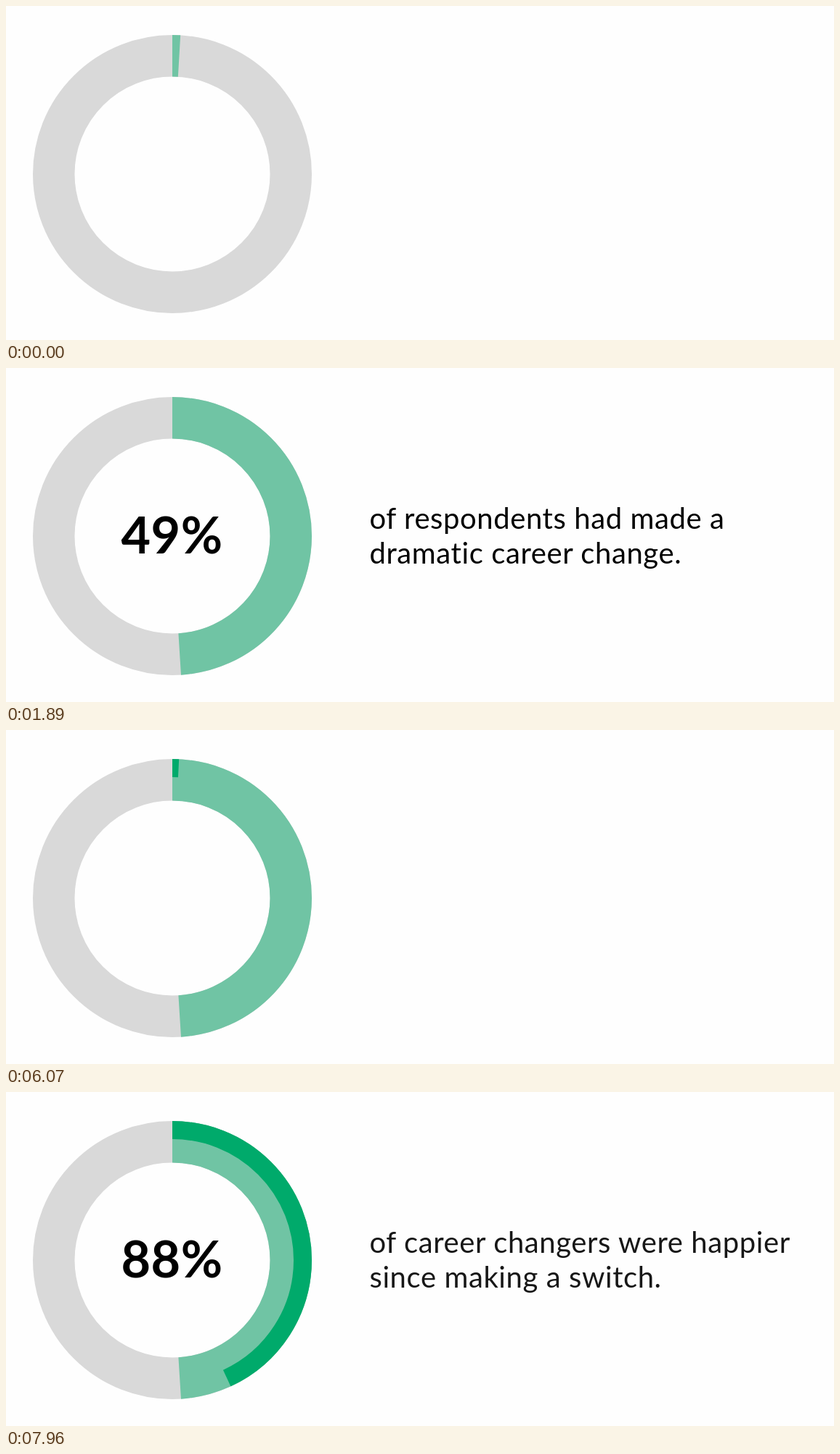
Animation of 1140 by 461 pixels, one loop 7990 ms. Source, as an HTML page:

```html
<!DOCTYPE html>
<html lang="en">
<head>
<meta charset="utf-8">
<title>Career change survey</title>
<style>
  html, body { margin: 0; height: 100%; overflow: hidden; background: #fefefe; }
  svg { display: block; width: 1140px; height: 461px; }
  circle { fill: none; stroke-width: 57.5; }
  text { font: 40px Lato, sans-serif; letter-spacing: .6px; }
  .number { font-size: 70px; font-weight: 700; letter-spacing: .5px; text-anchor: middle; }
</style>
</head>
<body>
<svg viewBox="0 0 1140 461">
  <g transform="translate(229 232) rotate(-90)">
    <circle r="163.25" stroke="#d9d9d9"/>
    <circle id="changed" r="163.25" stroke="#70c4a4" pathLength="360"/>
    <circle id="happier" r="179.5" stroke="#00aa6b" pathLength="360" style="stroke-width: 25"/>
  </g>
  <text id="number1" class="number" x="228.5" y="256">49%</text>
  <text id="number2" class="number" x="228.5" y="256">88%</text>
  <text id="caption1" y="222"><tspan x="500.5">of respondents had made a</tspan><tspan x="500.5" dy="48">dramatic career change.</tspan></text>
  <text id="caption2" y="222"><tspan x="500.5">of career changers were happier</tspan><tspan x="500.5" dy="48">since making a switch.</tspan></text>
</svg>
<script>
  const LOOP = 7990;
  const CHANGED = 360 * 0.49;
  const HAPPIER = CHANGED * 0.88;
  const $ = id => document.getElementById(id);

  // Eased progress from 0 to 1 between two times
  const ramp = (t, start, end) =>
    Math.min(1, Math.max(0, (t - start) / (end - start))) ** 1.36;

  const sweep = (id, degrees) => $(id).setAttribute('stroke-dasharray', `${degrees} 360`);
  const fade = (id, alpha) => $(id).setAttribute('opacity', alpha);

  function draw(t) {
    const fadeOut = ramp(t, 5010, 5760);
    sweep('changed', CHANGED * ramp(t, -30, 540));
    sweep('happier', HAPPIER * ramp(t, 6040, 6640));
    fade('number1', ramp(t, 660, 1380) - fadeOut);
    fade('caption1', ramp(t, 1500, 1890) - fadeOut);
    fade('number2', ramp(t, 6760, 7500));
    fade('caption2', ramp(t, 7570, 7990));
  }

  const begin = performance.now();
  function tick() {
    draw((performance.now() - begin) % LOOP);
    requestAnimationFrame(tick);
  }
  tick();
</script>
</body>
</html>
```
